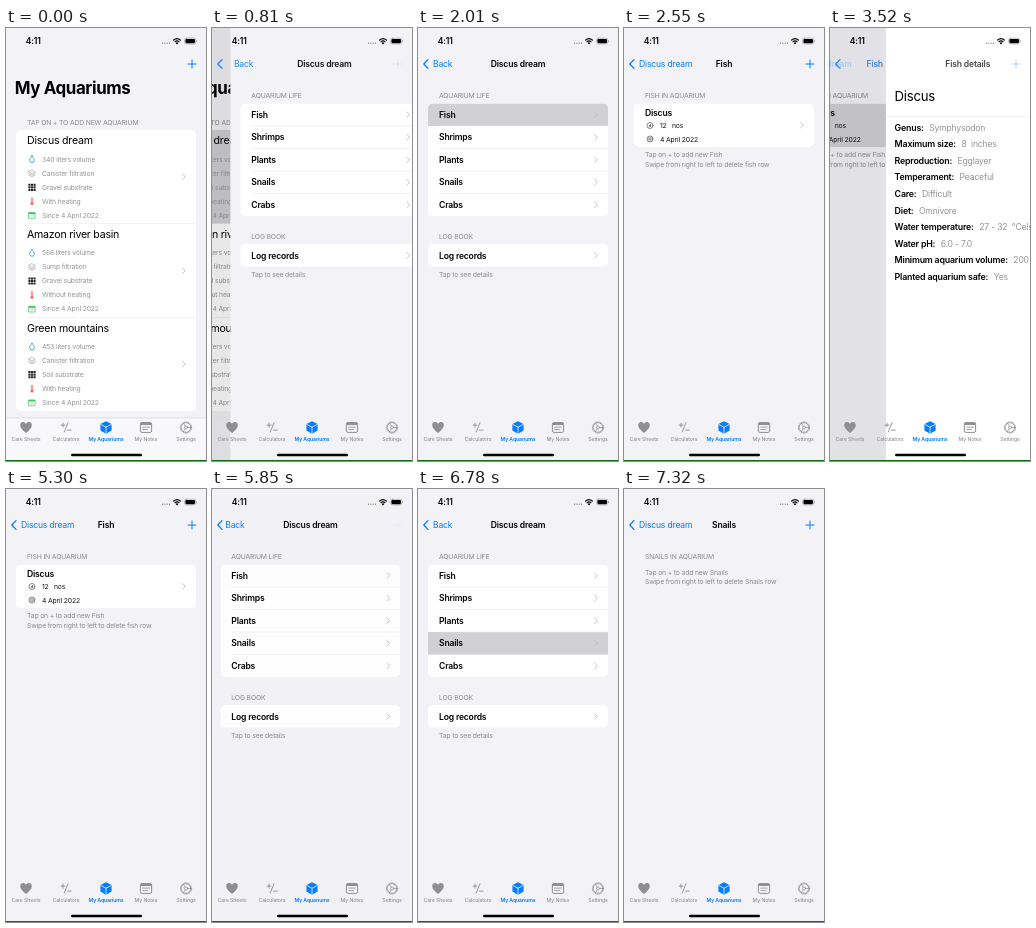
Recreate the animation shown at these times as an HTML page with a canvas. Size 200x433 px, loop 8000 ms.

```html
<!DOCTYPE html>
<html lang="en">
<head>
<meta charset="utf-8">
<title>Aquarium app</title>
<style>
html, body { margin: 0; width: 100%; height: 100%; overflow: hidden; background: #f2f2f7; }
canvas { display: block; width: 200px; height: 433px; }
</style>
</head>
<body>
<canvas id="stage"></canvas>
<script>
const W = 200, H = 433, LOOP = 8000;
const BLUE = '#067cff', GRAY = '#8b8b90', PALE = '#949498';
const BG = '#f2f2f7', LINE = '#e8e8eb', PRESSED = '#d0d0d5';
const canvas = document.getElementById('stage');
const g = canvas.getContext('2d');
const dpr = Math.max(1, window.devicePixelRatio || 1);
canvas.width = W * dpr;
canvas.height = H * dpr;

// ---------- helpers ----------
function setFont(size, weight) {
  g.font = `${weight} ${size}px Inter, Roboto, sans-serif`;
  g.letterSpacing = -0.022 * size + 'px';
}
// y is the middle of the capitals
function text(s, x, y, size = 6.8, color = GRAY, weight = 400, align = 'left') {
  setFont(size, weight);
  g.fillStyle = color;
  g.textAlign = align;
  g.fillText(s, x, y + size * 0.36);
}
function textWidth(s, size, weight) {
  setFont(size, weight);
  return g.measureText(s).width;
}
function rect(x, y, w, h, color, r = 0) {
  g.fillStyle = color;
  g.beginPath();
  g.roundRect(x, y, w, h, r);
  g.fill();
}
function frame(x, y, w, h, color, width, r = 0) {
  g.strokeStyle = color;
  g.lineWidth = width;
  g.beginPath();
  g.roundRect(x, y, w, h, r);
  g.stroke();
}
function stroke(d, color, width = 0.8) {
  g.strokeStyle = color;
  g.lineWidth = width;
  g.lineCap = g.lineJoin = 'round';
  g.stroke(new Path2D(d));
}
function fill(d, color) {
  g.fillStyle = color;
  g.fill(new Path2D(d));
}
function circle(x, y, r, color, width = 0.8) {
  g.strokeStyle = color;
  g.lineWidth = width;
  g.beginPath();
  g.arc(x, y, r, 0, 7);
  g.stroke();
}
function at(x, y, draw) {
  g.save();
  g.translate(x, y);
  draw();
  g.restore();
}
function faded(alpha, draw) {
  g.save();
  g.globalAlpha *= alpha;
  draw();
  g.restore();
}
function chevron(y) {
  at(178, y, () => stroke('M-1.4-2.7L1.4 0L-1.4 2.7', '#bdbdc1', 0.9));
}
// White card of equal rows; one of them may be pressed
function card(y, rowH, count, row, press, drawRow) {
  g.save();
  g.beginPath();
  g.roundRect(10, y, 180, rowH * count, 5);
  g.clip();
  rect(10, y, 180, rowH * count, '#fff');
  for (let i = 0; i < count; i++) {
    const top = y + i * rowH;
    if (i === row) faded(press, () => rect(10, top, 180, rowH, PRESSED));
    if (i) rect(21, top - 0.25, 169, 0.5, LINE);
    chevron(top + rowH / 2);
    drawRow(i, top);
  }
  g.restore();
}

// ---------- small icons, centred on 0,0 ----------
const rowIcons = [
  () => stroke('M0-3.4C1.2-1.7 2.3-.4 2.3 1A2.3 2.3 0 0 1-2.3 1C-2.3-.4-1.2-1.7 0-3.4Z', '#2d8cf0', 0.8),
  () => {
    stroke('M0-3.2L3.3-1.5L0 .2L-3.3-1.5Z', '#99999d', 0.6);
    stroke('M-3.3.2L0 1.9L3.3.2M-3.3 1.7L0 3.4L3.3 1.7', '#99999d', 0.6);
  },
  () => {
    for (let i = 0; i < 9; i++) rect(-3.6 + (i % 3) * 2.55, -3.6 + (i / 3 | 0) * 2.55, 2.1, 2.1, '#222', 0.3);
  },
  () => {
    stroke('M0-2.8V1.8', '#f58a84', 2.2);
    stroke('M0 2.1V2.2', '#f2655e', 3.1);
    stroke('M0-2.6V1.5', '#fbd0cc', 0.6);
  },
  () => {
    frame(-3.1, -2.8, 6.2, 5.8, '#43c463', 0.7);
    rect(-3.1, -2.8, 6.2, 1.7, '#43c463');
    rect(-1.8, 0.3, 3.6, 0.7, '#8bdc9f');
  }
];
const tabs = [
  ['Care Sheets', () => fill('M0 5.4C-3.4 2.7-5.8.4-5.8-2.2C-5.8-5.8-1.7-6.6 0-3.4C1.7-6.6 5.8-5.8 5.8-2.2C5.8.4 3.4 2.7 0 5.4Z', '#8e8e93')],
  ['Calculators', () => stroke('M-5-2.4H-1M-3-4.4V-.4M-1.8 4.6L2-4.8M1.6 2.6H5.2', '#8e8e93', 0.9)],
  ['My Aquariums', () => {
    fill('M0-6.2L5.6-3.4V3L0 6.2L-5.6 3V-3.4Z', BLUE);
    stroke('M-5.3-3.1L0-.3L5.3-3.1M0-.3V6', '#f7f7fa', 0.8);
  }],
  ['My Notes', () => {
    frame(-5.6, -4.9, 11.2, 9.8, '#8e8e93', 1, 1.5);
    rect(-5.6, -4.9, 11.2, 2.4, '#8e8e93', 1);
    stroke('M-3.3-.4H3.3M-3.3 2H1.5', '#8e8e93', 0.8);
  }],
  ['Settings', () => {
    circle(0, 0, 4.8, '#8e8e93', 0.8);
    g.setLineDash([1, 1.12]);
    circle(0, 0, 5.6, '#8e8e93', 0.8);
    g.setLineDash([]);
    circle(0, 0, 1.5, '#8e8e93', 0.7);
    stroke('M1.5 0H4.6M-.8-1.3L-2.4-4M-.8 1.3L-2.4 4', '#8e8e93', 0.7);
  }]
];

// ---------- screens ----------
const aquariums = [
  ['Discus dream', '340 liters volume', 'Canister filtration', 'Gravel substrate', 'With heating'],
  ['Amazon river basin', '566 liters volume', 'Sump filtration', 'Gravel substrate', 'Without heating'],
  ['Green mountains', '453 liters volume', 'Canister filtration', 'Soil substrate', 'With heating']
];
const facts = [
  ['Genus:', 'Symphysodon'], ['Maximum size:', '8  inches'], ['Reproduction:', 'Egglayer'],
  ['Temperament:', 'Peaceful'], ['Care:', 'Difficult'], ['Diet:', 'Omnivore'],
  ['Water temperature:', '27 - 32  °Celsius'], ['Water pH:', '6.0 - 7.0'],
  ['Minimum aquarium volume:', '200  Liters'], ['Planted aquarium safe:', 'Yes']
];
const life = ['Fish', 'Shrimps', 'Plants', 'Snails', 'Crabs'];
const label = (s, x, y) => text(s, x, y, 8.6, '#000', 600);

const screens = {
  home: {
    title: '', back: '', plus: true,
    draw(row, press) {
      text('My Aquariums', 8.7, 59.5, 16.9, '#000', 700);
      text('TAP ON + TO ADD NEW AQUARIUM', 21, 94.5);
      card(102, 93.7, 3, row, press, (i, y) => {
        const [name, ...items] = aquariums[i];
        text(name, 21, y + 10.3, 10.6, '#000');
        [...items, 'Since 4 April 2022'].forEach((s, k) => {
          const mid = y + 29.3 + k * 14;
          at(26, mid, rowIcons[k]);
          text(s, 36, mid, 6.8, PALE);
        });
      });
    }
  },
  tank: {
    title: 'Discus dream', back: 'Back',
    draw(row, press) {
      text('AQUARIUM LIFE', 21, 68);
      card(75.5, 22.5, 5, row, press, (i, y) => label(life[i], 21, y + 11.3));
      text('LOG BOOK', 21, 209);
      card(216, 22.8, 1, -1, 0, (i, y) => label('Log records', 21, y + 11.5));
      text('Tap to see details', 21, 247);
    }
  },
  fish: {
    title: 'Fish', back: 'Discus dream', plus: true,
    draw(row, press) {
      text('FISH IN AQUARIUM', 21, 68);
      card(75.5, 43.5, 1, row, press, () => {
        label('Discus', 21, 84.5);
        circle(26, 97.5, 3, '#333', 0.6);
        stroke('M25.2 98.8L26.6 96.2V98.8M25.2 97.8H27', '#333', 0.5);
        text('12   nos', 36, 97.5, 6.8, '#111');
        circle(26, 111, 3, '#333', 0.6);
        stroke('M24.6 109.9H27.4M24.6 111H27.4M24.6 112.1H27.4', '#333', 0.5);
        text('4 April 2022', 36, 111.3, 6.8, '#111');
      });
      text('Tap on + to add new Fish', 21, 127);
      text('Swipe from right to left to delete fish row', 21, 136.3);
    }
  },
  info: {
    title: 'Fish details', back: 'Fish', bg: '#fff',
    draw() {
      text('Discus', 8.7, 68.5, 13.2, '#000');
      rect(0, 88.5, W, 0.5, LINE);
      facts.forEach(([name, value], i) => {
        const y = 99.6 + i * 16.55;
        text(name, 8.7, y, 8.8, '#000', 600);
        text(value, 14.2 + textWidth(name, 8.8, 600), y + 0.07, 8.6, PALE);
      });
    }
  },
  snails: {
    title: 'Snails', back: 'Discus dream', plus: true,
    draw() {
      text('SNAILS IN AQUARIUM', 21, 68);
      text('Tap on + to add new Snails', 21, 83.3);
      text('Swipe from right to left to delete Snails row', 21, 92.5);
    }
  }
};

// ---------- bars ----------
function backArrow() {
  stroke('M10 31.6L5.8 36L10 40.4', BLUE, 1.3);
}
function plusSign() {
  stroke('M182 36H190M186 32V40', BLUE, 1);
}
// q runs from 0 (lower screen shown) to 1 (upper screen shown)
function navBar(under, over, q, pop) {
  const r = 1 - q, size = 8.6;
  const oldW = textWidth(under.title, size, 600);
  const backW = textWidth(over.back, size, 400);
  faded(r, () => {
    if (under.back) {
      backArrow();
      text(under.back, 15 - 65 * q, 36, size, BLUE);
    }
    if (under.plus) plusSign();
    text(under.title, 100 - (85 - oldW / 2) * q, 36, size, '#000', 600, 'center');
  });
  faded(q, () => {
    if (over.plus) plusSign();
    text(over.title, 100 + 135 * r, 36, size, '#000', 600, 'center');
  });
  faded(pop ? q * 0.16 : q, () => {
    backArrow();
    text(over.back, 15 + (85 - backW / 2) * r, 36, size, BLUE);
  });
}
function statusBar() {
  text('4:11', 27.2, 13.3, 8.6, '#000', 600, 'center');
  for (let i = 0; i < 4; i++) rect(156 + i * 2.3, 14.6, 1.2, 1.2, '#777', 0.6);
  stroke('M167.7 12A5 5 0 0 1 174.3 12M169 13.7A3.2 3.2 0 0 1 173 13.7', '#000', 1.2);
  fill('M169.6 14.9A2 2 0 0 1 172.4 14.9L171 16.4Z', '#000');
  frame(178.6, 10.2, 11.2, 5.8, '#888', 0.5, 1.8);
  rect(179.4, 11, 9.6, 4.2, '#000', 1.1);
  rect(190.3, 12.2, 0.7, 1.8, '#888', 0.3);
}
function tabBar() {
  tabs.forEach(([name, icon], i) => {
    const x = 20 + i * 40;
    at(x, 399.5, icon);
    text(name, x, 411.3, 5.2, i === 2 ? BLUE : PALE, i === 2 ? 600 : 500, 'center');
  });
  rect(65, 425.7, 71, 2.6, '#000', 1.3);
  rect(0, 432, W, 1, '#0b700f');
}

// ---------- timeline ----------
// start, length, lag, lower screen, upper screen, pressed row, going back
const moves = [
  [500, 620, 92, 'home', 'tank', 0],
  [2010, 540, 12, 'tank', 'fish', 0],
  [3370, 540, 12, 'fish', 'info', 0],
  [4760, 540, 12, 'fish', 'info', 0, true],
  [5540, 540, 12, 'tank', 'fish', 0, true],
  [6780, 540, 12, 'tank', 'snails', 3]
];
function spring(ms) {
  const k = Math.max(0, ms) * 0.01826;
  return 1 - (1 + k) * Math.exp(-k);
}
function render(t) {
  const started = moves.filter(m => t >= m[0]).pop();
  const [start, length, lag, low, high, row, pop] = started || moves[0];
  const age = t - start;
  const p = age >= length ? 1 : spring(age - lag);
  const q = pop ? 1 - p : p;
  const press = !started ? 0 : pop ? q : 1;
  const under = screens[low], over = screens[high];

  g.setTransform(dpr, 0, 0, dpr, 0, 0);
  rect(0, 0, W, H, BG);
  at(-60 * q, 0, () => under.draw(row, press));
  if (low === 'home') faded(1 - q, () => {
    rect(0, 390, W, 43, '#f8f8fa');
    rect(0, 389.7, W, 0.5, '#c9c9cc');
  });
  rect(0, 0, W, H, `rgba(0,0,0,${0.1 * q})`);
  at(W * (1 - q), 0, () => {
    rect(0, 0, W, H, over.bg || BG);
    over.draw(-1, 0);
  });
  navBar(under, over, q, pop);
  statusBar();
  tabBar();
}

const begin = performance.now();
function tick() {
  render((performance.now() - begin) % LOOP);
  requestAnimationFrame(tick);
}
tick();
</script>
</body>
</html>
```
